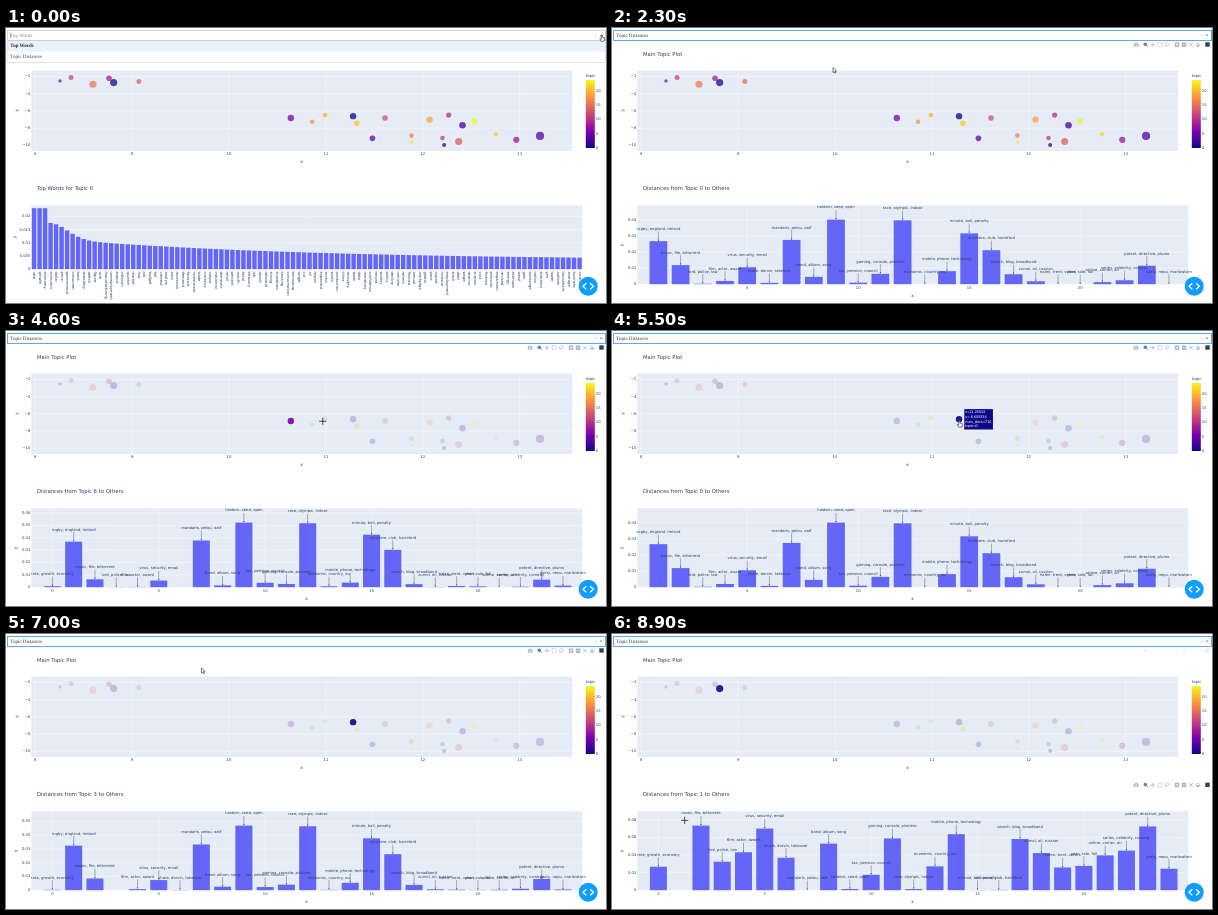
Write an HTML page with a canvas that moves like this. It is 600 px wide and 275 px high and loops after 9 s.

```html
<!DOCTYPE html>
<html lang="en">
<head>
<meta charset="utf-8">
<title>Topic dashboard</title>
<style>
html, body { margin: 0; width: 100%; height: 100%; overflow: hidden; background: #fff; }
canvas { display: block; width: 600px; height: 275px; }
</style>
</head>
<body>
<canvas id="stage"></canvas>
<script>
const W = 600, H = 275, LOOP = 9000, STEP = 100;
const INK = '#2a3f5f', PANEL = '#e5ecf6', BAR = '#6366f6';
const SANS = '"DejaVu Sans", sans-serif';
const SERIF = '"Liberation Serif", serif';
const PLASMA = ['#0d0887', '#46039f', '#7201a8', '#9c179e', '#bd3786',
  '#d8576b', '#ed7953', '#fb9f3a', '#fdca26', '#f0f921'];

const canvas = document.getElementById('stage');
const ctx = canvas.getContext('2d');
const dpr = window.devicePixelRatio || 1;
canvas.width = W * dpr;
canvas.height = H * dpr;

// topic positions in plot units, with a dot radius in px; the index is the topic
const topics = [
  [11.28043, -6.609334, 3.2], [8.81, -2.71, 3.6], [12.22, -9.965, 2], [12.41, -7.67, 3.3],
  [13.21, -8.91, 4.1], [11.48, -9.19, 2.8], [10.6382, -6.833711, 3.2], [8.256, -2.51, 1.7],
  [12.965, -9.36, 3.1], [8.762, -2.2, 2.8], [12.267, -6.48, 2.6], [12.203, -9.15, 2.3],
  [8.37, -2.116, 2.5], [11.61, -6.83, 2.8], [12.37, -9.547, 3.5], [9.07, -2.59, 2.5],
  [8.596, -2.89, 3.5], [11.883, -8.87, 2.3], [10.857, -7.27, 2.3], [12.07, -7.01, 3.2],
  [10.99, -6.5, 2.4], [11.32, -7.43, 2.8], [12.755, -8.72, 2.3], [11.885, -9.64, 1.4],
  [12.53, -7.17, 3]
];

const labels = ['rate, growth, economy', 'rugby, england, ireland', 'music, file, bittorrent',
  'lord, police, law', 'film, actor, award', 'virus, security, email', 'share, dorvin, takeover',
  'mandaris, pelou, oatf', 'band, album, song', 'haldern, seed, open', 'tax, pension, council',
  'gaming, console, pixolero', 'race, olympic, indoor', 'economic, country, eu',
  'mobile, phone, technology', 'minute, ball, penalty', 'dunmere, club, harroford',
  'search, blog, broadband', 'zumol, oil, russian', 'halen, trent, voters', 'year, sale, fall',
  'airline, carrier, air', 'series, celebrity, comedy', 'patent, directive, plumo',
  'party, nepu, marlowtarn'];

const words = ('rate growth economy economic dollar price government consumer bank spending deficit figure ' +
  'sale manufacturing unemployment export inflation quarter market rise job budget fall interest analyst ' +
  'euro recession demand forecast investment trade currency output industrial domestic retail percent month ' +
  'fiscal treasury job report rebound strong slowdown housing consumption borrowing target cut oil region ' +
  'expected sector world production china recovery weak data monetary confidence record worker policy ' +
  'decline minister reform finance annual mortgage global pace import investor employment stock debt wage ' +
  'reserve surplus cost finance pressure expansion revised energy estimate boost gain exchange nation ' +
  'statistics yen lower outlook household average business income').split(' ');

// cursor: time, x, y
const path = [[0, 596, 7], [500, 595, 8], [1400, 541.5, 28], [1700, 538, 28], [2300, 221, 39.5],
  [3000, 285, 90], [4300, 286.5, 91.5], [4900, 347, 89], [6000, 348, 90.5], [6300, 456, 97],
  [6500, 456, 97], [7000, 195.5, 34], [7500, 107, 54], [8100, 107.5, 55], [8700, 73, 186],
  [9000, 72.5, 186.5]];

const at = (t, steps) => steps.filter(s => t >= s[0]).pop()[1];
const px = x => 29.2 + (x - 8) * 96.9;
const py = y => 48.5 - (y + 2) * 8.6;

function along(points, v) {
  let i = 1;
  while (i < points.length - 1 && points[i][0] < v) i++;
  const a = points[i - 1], b = points[i];
  const k = Math.min(1, Math.max(0, (v - a[0]) / (b[0] - a[0])));
  return a.slice(1).map((n, j) => n + (b[j + 1] - n) * k);
}

function plasma(topic) {
  const p = Math.min(8.999, topic / 24 * 9), i = Math.floor(p), k = p - i;
  const part = (c, j) => parseInt(c.substr(1 + j * 2, 2), 16);
  return 'rgb(' + [0, 1, 2].map(j =>
    Math.round(part(PLASMA[i], j) * (1 - k) + part(PLASMA[i + 1], j) * k)) + ')';
}

// cosine distance between two topic positions
function distance(a, b) {
  const [ax, ay] = topics[a], [bx, by] = topics[b];
  return 1 - (ax * bx + ay * by) / (Math.hypot(ax, ay) * Math.hypot(bx, by));
}

function rect(x, y, w, h, color) {
  ctx.fillStyle = color;
  ctx.fillRect(x, y, w, h);
}

function frameBox(x, y, w, h, color, width) {
  ctx.strokeStyle = color;
  ctx.lineWidth = width;
  ctx.strokeRect(x, y, w, h);
}

function line(color, width, ...p) {
  ctx.strokeStyle = color;
  ctx.lineWidth = width;
  ctx.beginPath();
  for (let i = 0; i < p.length; i += 2) ctx.lineTo(p[i], p[i + 1]);
  ctx.stroke();
}

function poly(x, y, points, color) {
  ctx.fillStyle = color;
  ctx.beginPath();
  points.forEach(([a, b]) => ctx.lineTo(x + a, y + b));
  ctx.closePath();
  ctx.fill();
}

function circle(x, y, r, color) {
  ctx.fillStyle = color;
  ctx.beginPath();
  ctx.arc(x, y, r, 0, Math.PI * 2);
  ctx.fill();
}

function text(s, x, y, size, align = 'left', color = INK, face = SANS, weight = '') {
  ctx.font = `${weight} ${size}px ${face}`;
  ctx.textAlign = align;
  ctx.textBaseline = 'middle';
  ctx.fillStyle = color;
  ctx.fillText(s, x, y);
}

function turned(s, x, y, size, angle, align) {
  ctx.save();
  ctx.translate(x, y);
  ctx.rotate(angle);
  text(s, 0, 0, size, align);
  ctx.restore();
}

function axisNames(x, bottom, left, y) {
  if (x) text('x', x, bottom, 4.4, 'center');
  turned('y', left, y, 4.4, -Math.PI / 2, 'center');
}

function rows(count, base, gap, right, label) {
  for (let i = 0; i < count; i++) {
    const y = base - i * gap;
    line('#fff', 0.4, 25.3, y, right, y);
    text(label(i), 24.3, y, 3.75, 'right');
  }
}

function dropdown(t, y) {
  const open = t < 1700;
  frameBox(1.5, 2.5, 598, 10, open ? '#d6d6d6' : '#62a8e8', 1);
  text(open ? 'Top Words' : 'Topic Distances', 4.3, 7.6, 5, 'left', open ? '#888' : '#333', SERIF);
  if (open) line('#333', 0.4, 4.4, 4.8, 4.4, 10.2);
  text('×', 589.8, 7.6, 4.5, 'center', '#999', SERIF);
  const d = open ? -0.9 : 0.9;
  poly(595, 7.5, [[-1.6, -d], [1.6, -d], [0, d]], '#999');
  if (!open) return;
  rect(1, 13, 598.4, 21.4, '#fff');
  rect(1, y < 23 ? 13 : 23.5, 598.4, 10.6, '#e8f3ff');
  text('Top Words', 4.3, 18.2, 5, 'left', '#222', SERIF, 'bold');
  text('Topic Distances', 4.3, 28.8, 5, 'left', '#444', SERIF);
  frameBox(1, 12.8, 598.4, 21.6, '#c8c8c8', 0.5);
}

function scatter(t, chosen) {
  if (t >= 1700) text('Main Topic Plot', 31, 26.2, 5.3);
  rect(25.3, 42.5, 541, 80.5, PANEL);
  for (let v = 8; v <= 13; v++) {
    line('#fff', 0.4, px(v), 42.5, px(v), 123);
    text(v, px(v), 126, 3.75, 'center');
  }
  rows(5, py(-10), 17.2, 566.3, i => '−' + (10 - i * 2));
  axisNames(295.6, 133.8, 11, 82.5);
  topics.forEach(([x, y, r], i) => {
    ctx.globalAlpha = chosen === null ? 0.76 : i === chosen ? 0.92 : 0.2;
    circle(px(x), py(y), r, plasma(i));
  });
  ctx.globalAlpha = 1;

  text('topic', 579.8, 48.3, 3.9);
  const ramp = ctx.createLinearGradient(0, 120, 0, 52);
  PLASMA.forEach((c, i) => ramp.addColorStop(i / 9, c));
  rect(579.8, 52, 9, 68, ramp);
  for (let v = 0; v <= 20; v += 5) text(v, 589.8, 119.8 - v * 2.83, 3.75);
}

function wordChart() {
  const base = 241.2, gap = 5.51;
  text('Top Words for Topic 0', 31, 160.2, 5.3);
  rect(25.3, 177.3, 551, base - 177.3, PANEL);
  rows(5, base, 13.2, 576.3, i => i * 5 / 1000);
  axisNames(null, 0, 8.5, 209);
  words.slice(0, 100).forEach((word, i) => {
    const tail = 9 + 17 * Math.exp((14 - i) / 45);
    const h = i < 3 ? 61 : tail + 15.5 * Math.exp(-(((i - 3) / 4.3) ** 2));
    const x = 25.3 + i * gap;
    rect(x + gap * 0.1, base - h, gap * 0.8, h, BAR);
    turned(word, x + gap / 2, 243.4, 3.75, Math.PI / 2, 'left');
  });
}

function topicChart(topic) {
  const base = 256.2, height = 78.9;
  const first = topic === 0 ? 1 : 0;
  const gap = 510.6 / (24 - first);
  const pos = i => 46.4 + (i - first) * gap;
  const dist = topics.map((_, i) => distance(topic, i));
  const max = Math.max(...dist), scale = 64.6 / max;
  const tick = max > 0.065 ? 0.02 : 0.01;

  text(`Distances from Topic ${topic} to Others`, 31, 160.2, 5.3);
  rect(25.3, base - height, 551, height, PANEL);
  rows(Math.floor(height / scale / tick) + 1, base, tick * scale, 576.3, i => +(i * tick).toFixed(2));
  for (let i = first * 5; i <= 20; i += 5) {
    line('#fff', 0.4, pos(i), base - height, pos(i), base);
    text(i, pos(i), 260, 3.75, 'center');
  }
  axisNames(300.5, 267.5, 10, 217);

  const each = fn => dist.forEach((d, i) => i !== topic && fn(pos(i), base - d * scale, i));
  each((x, y) => rect(x - gap * 0.4, y, gap * 0.8, base - y, BAR));
  each((x, y, i) => {
    line(INK, 0.4, x, y - 9.6, x, y - 0.8);
    poly(x, y, [[-0.7, -1.5], [0.7, -1.5], [0, 0]], INK);
    text(labels[i], x, y - 12.1, 3.75, 'center');
  });
}

function toolbar(y, alpha) {
  const c = '#a9b1bf', dark = '#727d90';
  ctx.save();
  ctx.globalAlpha = alpha;
  ctx.translate(0, y);
  rect(521.8, -1.3, 4.6, 3.2, c);
  rect(523.2, -2, 1.8, 1, c);
  circle(524.1, 0.4, 0.9, '#fff');
  circle(533.3, -0.4, 1.8, dark);
  line(dark, 0.9, 534.3, 0.6, 536, 2.2);
  line(c, 0.7, 538.6, 0, 543.4, 0);
  line(c, 0.7, 541, -2.4, 541, 2.4);
  ctx.setLineDash([1, 0.4]);
  frameBox(546, -2, 4, 4, c, 0.6);
  ctx.setLineDash([]);
  ctx.beginPath();
  ctx.ellipse(555.3, -0.5, 2.2, 1.5, -0.3, 0, Math.PI * 2);
  ctx.stroke();
  line(c, 0.6, 553.8, 0.7, 554.2, 2.3);
  for (const x of [565, 572]) {
    rect(x - 2.2, -2.2, 4.4, 4.4, c);
    line('#fff', 0.7, x - 1.4, 0, x + 1.4, 0);
  }
  line('#fff', 0.7, 565, -1.4, 565, 1.4);
  line(c, 0.8, 577, -2, 581, 2);
  line(c, 0.8, 577, 2, 581, -2);
  line(c, 0.8, 583.7, 0.2, 586, -2, 588.3, 0.2);
  rect(584.6, 0, 2.8, 2, c);
  rect(593.3, -2.4, 4.4, 4.4, '#34405a');
  ctx.restore();
}

function tooltip(topic) {
  const [x, y] = topics[topic];
  const left = px(x) + 5, top = py(y) - 10.2;
  const docs = Math.round(710 / (1 + topic * 0.95));
  rect(left, top, 29, 20.8, plasma(topic));
  frameBox(left, top, 29, 20.8, '#fff', 0.3);
  ['x=' + x, 'y=' + y, 'num_docs=' + docs, 'topic=' + topic].forEach((s, i) =>
    text(s, left + 1.3, top + 3.1 + i * 4.8, 3.8, 'left', '#fff', '"Liberation Sans", sans-serif'));
}

function pointer(x, y, hand, cross) {
  if (cross && !hand) {
    line('#222', 0.8, x - 3.6, y, x + 3.6, y);
    line('#222', 0.8, x, y - 3.6, x, y + 3.6);
    return;
  }
  poly(x, y, hand
    ? [[-0.7, 0], [0.5, 0], [0.5, 2.3], [2.8, 2.9], [2.7, 5], [2, 6.3], [-0.9, 6.3], [-2.2, 3.8], [-0.7, 4]]
    : [[0, 0], [0, 5], [1.2, 4], [2, 5.7], [2.9, 5.3], [2.1, 3.6], [3.6, 3.5]], '#fff');
  ctx.strokeStyle = '#222';
  ctx.lineWidth = 0.6;
  ctx.stroke();
}

function codeButton(x, y) {
  circle(x, y, 9.5, '#119dff');
  for (const s of [-1, 1]) {
    line('#fff', 1.3, x + s * 1.9, y - 3.1, x + s * 5.2, y, x + s * 1.9, y + 3.1);
  }
}

function draw(t) {
  const [x, y] = along(path, t);
  const chosen = at(t, [[0, null], [3200, 6], [5000, 0], [7600, 1]]);
  const shown = at(t, [[0, null], [1800, 0], [3200, 6], [4900, 0], [6300, 3], [7600, 1]]);
  const hit = topics.findIndex(p => Math.hypot(px(p[0]) - x, py(p[1]) - y) < 3.2);
  const inside = x > 25 && ((x < 566 && y > 42 && y < 123) || (x < 576 && y > 177 && y < 256));

  ctx.setTransform(dpr, 0, 0, dpr, 0, 0);
  ctx.textRendering = 'geometricPrecision';
  rect(0, 0, W, H, '#fff');
  scatter(t, chosen);
  if (shown === null) wordChart();
  else topicChart(shown);
  if (t >= 1900) {
    const low = y > 138;
    toolbar(16.7, low ? 0.08 : 1);
    if (low) toolbar(151, 1);
  }
  dropdown(t, y);
  codeButton(582.2, 258.3);
  if (hit >= 0) tooltip(hit);
  pointer(x, y, hit >= 0 || t < 900, inside);
}

const start = performance.now();
function frame() {
  const t = (performance.now() - start) % LOOP;
  draw(Math.floor(t / STEP) * STEP);
  requestAnimationFrame(frame);
}
frame();
</script>
</body>
</html>
```
